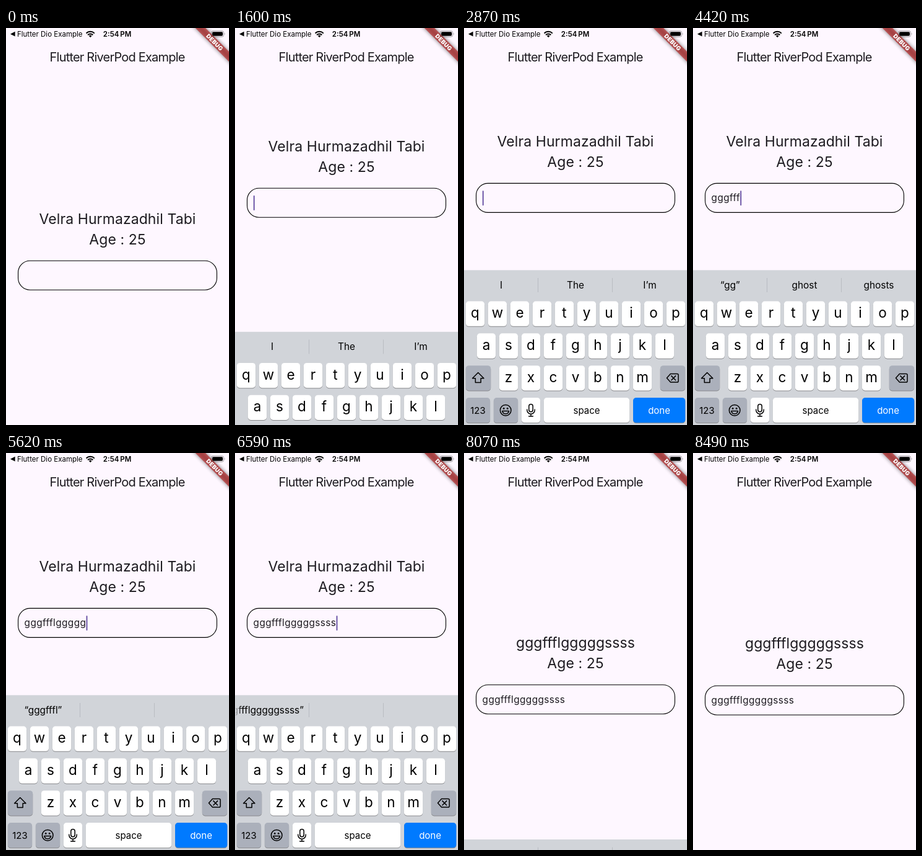
These frames come from a looping animation (360 px wide and 640 px high, 9.9 s). An HTML page:

```html
<!DOCTYPE html>
<html lang="en">
<head>
<meta charset="utf-8">
<title>Flutter RiverPod Example</title>
<style>
  html, body { margin: 0; width: 100%; height: 100%; overflow: hidden; background: #fef7ff; }
  svg { display: block; width: 360px; height: 640px; overflow: hidden; }
  text { font-family: Inter, "Open Sans", sans-serif; font-optical-sizing: none; fill: #1d1b20; white-space: pre; }
  .mid { text-anchor: middle; }
  .status { font-size: 11.5px; fill: #000; }
  .time { font-weight: 600; word-spacing: -1px; }
  .title { font-size: 20px; letter-spacing: -.8px; }
  .big { font-size: 23px; letter-spacing: .08px; }
  .input { font-size: 15.36px; letter-spacing: .4px; }
  .debug { font-size: 9.8px; font-weight: 900; letter-spacing: .3px; fill: #fff; }
  #keyboard text { fill: #000; text-anchor: middle; font-size: 15px; }
  #keyboard .hint { font-size: 15.36px; }
  #keyboard .letter { font-size: 22.5px; }
  #keyboard .white { fill: #fff; }
  .line { fill: none; stroke: #000; stroke-width: 1.5; stroke-linecap: round; stroke-linejoin: round; }
</style>
</head>
<body>
<svg viewBox="0 0 360 640">
  <defs>
    <filter id="soft" x="-20%" y="-150%" width="140%" height="400%"><feGaussianBlur stdDeviation="3.6"/></filter>
    <linearGradient id="fade">
      <stop offset="0" stop-color="#d1d4d9"/>
      <stop offset="1" stop-color="#d1d4d9" stop-opacity="0"/>
    </linearGradient>
  </defs>
  <rect width="360" height="640" fill="#fef7ff"/>
  <text class="mid title" x="179.6" y="54">Flutter RiverPod Example</text>

  <g id="content">
    <text id="name" class="mid big" x="180" y="315.5"></text>
    <text class="mid big" x="180" y="348.5">Age : 25</text>
    <rect x="19.6" y="375.2" width="320.8" height="47" rx="19.2" fill="none" stroke="#000" stroke-width="1.1"/>
    <text id="input" class="input" x="29.6" y="404"></text>
    <rect id="caret" y="387" width="1.9" height="24" rx=".9" fill="#6750a4"/>
  </g>

  <g id="keyboard">
    <rect y="390.4" width="360" height="252" fill="#d1d4d9"/>
    <path d="M119.5 403V426M239.5 403V426" stroke="#b9bcc2"/>
    <text class="hint" y="420"></text>
    <text class="hint" x="180" y="420"></text>
    <text class="hint" x="300" y="420"></text>
    <rect id="hintFade" y="400" width="10" height="30" fill="url(#fade)"/>
    <g id="keys"></g>
    <path class="line" d="M22.8 555.5L32 564.8H27.2V571.4H18.4V564.8H13.6Z"/>
    <path class="line" d="M327.4 564.3L333.4 557.6H344.2Q346 557.6 346 559.4V569.2Q346 571 344.2 571H333.4ZM334.8 560.9L341.6 567.7M341.6 560.9L334.8 567.7"/>
    <g>
      <circle class="line" cx="67.2" cy="616.2" r="8.8"/>
      <circle cx="64.2" cy="613.4" r="1.4"/>
      <circle cx="70.2" cy="613.4" r="1.4"/>
      <path class="line" d="M61.8 617.4H72.6Q71.6 622 67.2 622T61.8 617.4Z"/>
    </g>
    <rect class="line" x="104.8" y="606.4" width="6.4" height="12.4" rx="3.2"/>
    <path class="line" d="M101.8 615V616A6.2 6.2 0 0 0 114.2 616V615M108 622.2V626M104.6 626H111.4"/>
  </g>

  <g transform="translate(360 0) rotate(45) scale(.96)">
    <rect x="-60" y="28" width="120" height="12" fill="#000" opacity=".5" filter="url(#soft)"/>
    <rect x="-60" y="28" width="120" height="12" fill="#b71c1c" opacity=".627"/>
    <text class="mid debug" x="0" y="37.6">DEBUG</text>
  </g>

  <path d="M14.6 5.8V13.6L7 9.7Z"/>
  <text class="status" x="18" y="14">Flutter Dio Example</text>
  <g class="line" style="stroke-width:2;stroke-linecap:butt">
    <path d="M129.6 8.6A9.2 9.2 0 0 1 142.8 8.6M132.1 11.2A5.8 5.8 0 0 1 140.3 11.2"/>
  </g>
  <path d="M136.2 15.2L133.9 12.8A3.2 3.2 0 0 1 138.5 12.8Z"/>
  <text class="mid status time" x="179.6" y="14">2:54 PM</text>
  <rect x="331.5" y="4.7" width="20" height="9.6" rx="3" fill="none" stroke="#000" stroke-opacity=".35"/>
  <rect x="333" y="6.2" width="17" height="6.6" rx="1.7"/>
  <path d="M352.8 8A1.8 1.8 0 0 1 352.8 11Z" opacity=".4"/>
</svg>

<script>
const LOOP = 9900, KEYBOARD = 249.6;
const SHOW = 1488, FOCUS = 1380, DONE = 7790;
const WORD = "gggffflgggggssss", NAME = "Velra Hurmazadhil Tabi";
const KEY_TIMES = [3480, 3590, 3700, 3910, 4020, 4210, 4740, 4860, 4980, 5100, 5250, 5400, 6050, 6160, 6260, 6360];
const HINTS = [
  [0, "I", "The", "I’m"],
  [3800, "“gg”", "ghost", "ghosts"],
  [5080, "“gggfffl”", "", ""],
  [5840, "“gggffflggggg”", "", ""],
  [6590, "“" + WORD + "”", "", ""]
];
// Screen updates: start, end, count
const BURSTS = [
  [1490, 2470, 10], [2670, 3070, 5], [3370, 4320, 10], [4420, 5410, 10],
  [5520, 6480, 10], [6590, 7360, 8], [7700, 8490, 8]
];

const $ = id => document.getElementById(id);
const hints = document.querySelectorAll(".hint");

function buildKeys() {
  const out = [];
  const key = (x, row, w, label = "", fill = "#fff", cls = "") => {
    const y = 440.5 + row * 51.84;
    out.push(`<rect x="${x}" y="${y + 1}" width="${w}" height="40.3" rx="4.8" fill="#898a8d"/>`,
      `<rect x="${x}" y="${y}" width="${w}" height="40.3" rx="4.8" fill="${fill}"/>`,
      `<text class="${cls}" x="${x + w / 2}" y="${y + (cls === "letter" ? 26.7 : 25.6)}">${label}</text>`);
  };
  const grey = "#abb0bb";
  [["qwertyuiop", 2.9], ["asdfghjkl", 20.9], ["zxcvbnm", 56.9]].forEach(([letters, x], row) =>
    [...letters].forEach((c, i) => key(x + i * 36, row, 30.2, c, "#fff", "letter")));
  key(2.9, 2, 40.3, "", grey);
  key(316.8, 2, 40.3, "", grey);
  key(2.9, 3, 39.2, "123", grey);
  key(47.9, 3, 39.2, "", grey);
  key(92.9, 3, 30.2);
  key(128.9, 3, 138.2, "space");
  key(273, 3, 84.2, "done", "#007aff", "white");
  $("keys").innerHTML = out.join("");
}

function snap(t) {
  let s = 0;
  for (const [a, b, n] of BURSTS) {
    if (t < a) break;
    const step = (b - a) / (n - 1);
    s = a + Math.min(n - 1, Math.floor((t - a) / step + 1e-6)) * step;
  }
  return s;
}

// Critically damped spring, 0 to 1
function spring(ms, rate) {
  const x = Math.max(0, ms) / 1000 * rate;
  return 1 - (1 + x) * Math.exp(-x);
}

// One-second blink with soft edges
function blink(ms) {
  const p = ms / 1000 % 1;
  if (p < .5) return 1;
  return p < .75 ? Math.max(0, 1 - (p - .5) / .15) : Math.max(0, (p - .85) / .15);
}

function setText(el, s) {
  if (el.textContent !== s) el.textContent = s;
}

function draw(t) {
  const rise = spring(t - SHOW, 18.3) - spring(t - DONE - 10, 18.3);
  const lift = spring(t - 1420, 25) - spring(t - DONE + 10, 25);
  $("keyboard").setAttribute("transform", `translate(0 ${KEYBOARD * (1 - rise)})`);
  $("keyboard").style.display = rise > .001 ? "" : "none";
  $("content").setAttribute("transform", `translate(0 ${-KEYBOARD / 2 * lift})`);

  const typed = KEY_TIMES.filter(k => k <= t);
  setText($("name"), t >= DONE ? WORD : NAME);
  setText($("input"), WORD.slice(0, typed.length));

  const focused = t >= FOCUS && t < DONE;
  const since = t - (typed.length ? typed[typed.length - 1] : FOCUS);
  const end = typed.length ? $("input").getComputedTextLength() : 0;
  $("caret").setAttribute("x", 29.8 + end);
  $("caret").setAttribute("opacity", focused ? blink(since) : 0);

  const [, ...words] = HINTS.filter(h => h[0] <= t).pop();
  words.forEach((w, i) => setText(hints[i], w));
  const long = words[0].length > 14;
  hints[0].setAttribute("x", long ? 111 : 60);
  hints[0].style.textAnchor = long ? "end" : "middle";
  $("hintFade").style.display = long ? "" : "none";
}

buildKeys();
const start = performance.now();
function tick() {
  draw(snap((performance.now() - start) % LOOP));
  requestAnimationFrame(tick);
}
tick();
</script>
</body>
</html>
```
